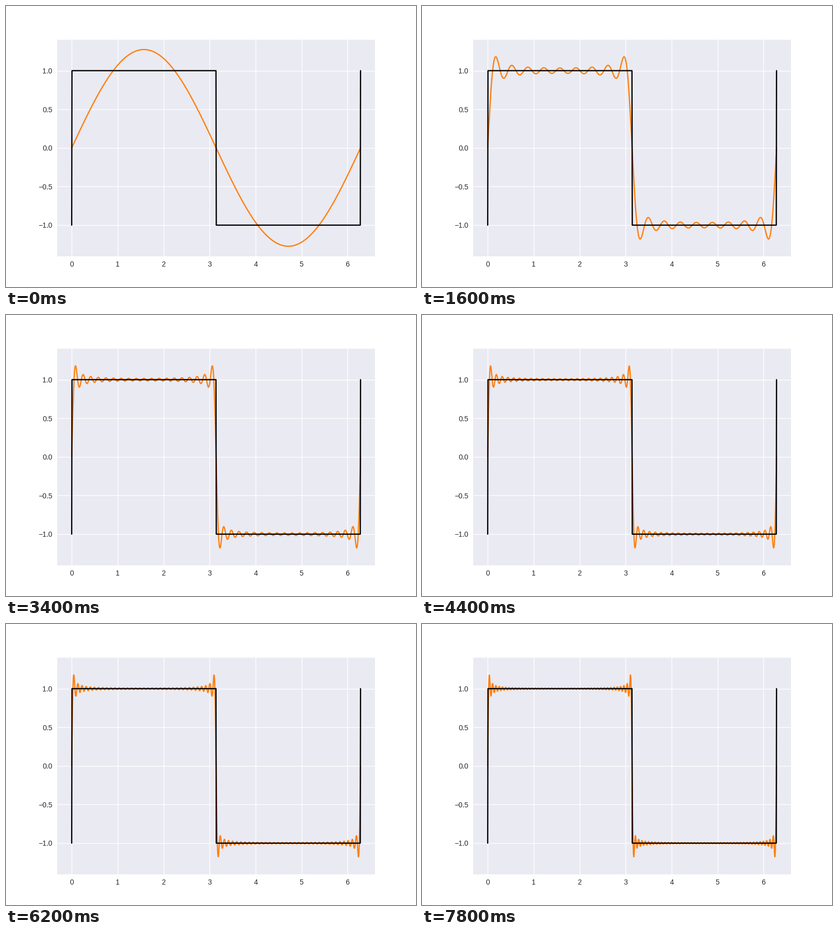
Recreate the animation shown at these times as a matplotlib script. Size 800 by 550 pixels, loop 8 s.

```python
import numpy as np
import matplotlib.pyplot as plt
from matplotlib.animation import FuncAnimation

FRAMES = 40
INTERVAL = 200   # ms each picture stays
TERM_TIME = 180  # ms needed to add one harmonic

plt.rcParams.update({
    "font.family": "Liberation Sans",
    "text.color": ".15",
    "axes.facecolor": "#EAEAF2",
    "axes.edgecolor": "white",
    "axes.linewidth": 0,
    "axes.grid": True,
    "axes.axisbelow": True,
    "grid.color": "white",
    "grid.linestyle": "-",
    "grid.linewidth": 1,
    "lines.linewidth": 1.75,
    "lines.solid_capstyle": "round",
    "xtick.color": ".15",
    "ytick.color": ".15",
    "xtick.labelsize": 10,
    "ytick.labelsize": 10,
    "xtick.major.size": 0,
    "ytick.major.size": 0,
    "xtick.major.pad": 7,
    "ytick.major.pad": 7,
})

x = np.linspace(0, 2 * np.pi, 1000)
square = np.where((x > 0) & (x < np.pi), 1.0, -1.0)
square[-1] = 1.0


def partial_sum(terms):
    """Fourier series of the square wave, cut after the given terms."""
    odd = 2 * np.arange(terms)[:, None] + 1
    return 4 / np.pi * (np.sin(odd * x) / odd).sum(axis=0)


fig = plt.figure(figsize=(8, 5.5), dpi=100, facecolor="white")
ax = fig.add_axes([0.125, 0.11, 0.775, 0.77])
wave, = ax.plot(x, partial_sum(1), color="#ff7f0e")
ax.plot(x, square, color="black")

pad = 0.05 * 2 * np.pi
top = 1.1 * 4 / np.pi
ax.set_xlim(-pad, 2 * np.pi + pad)
ax.set_ylim(-top, top)
ax.set_xticks(range(7))
ax.set_yticks(np.linspace(-1, 1, 5))


def update(frame):
    terms = 1 + frame * INTERVAL // TERM_TIME
    wave.set_ydata(partial_sum(terms))
    return wave,


anim = FuncAnimation(fig, update, frames=FRAMES, interval=INTERVAL,
                     repeat=True, repeat_delay=0, blit=False)
plt.show()
```
